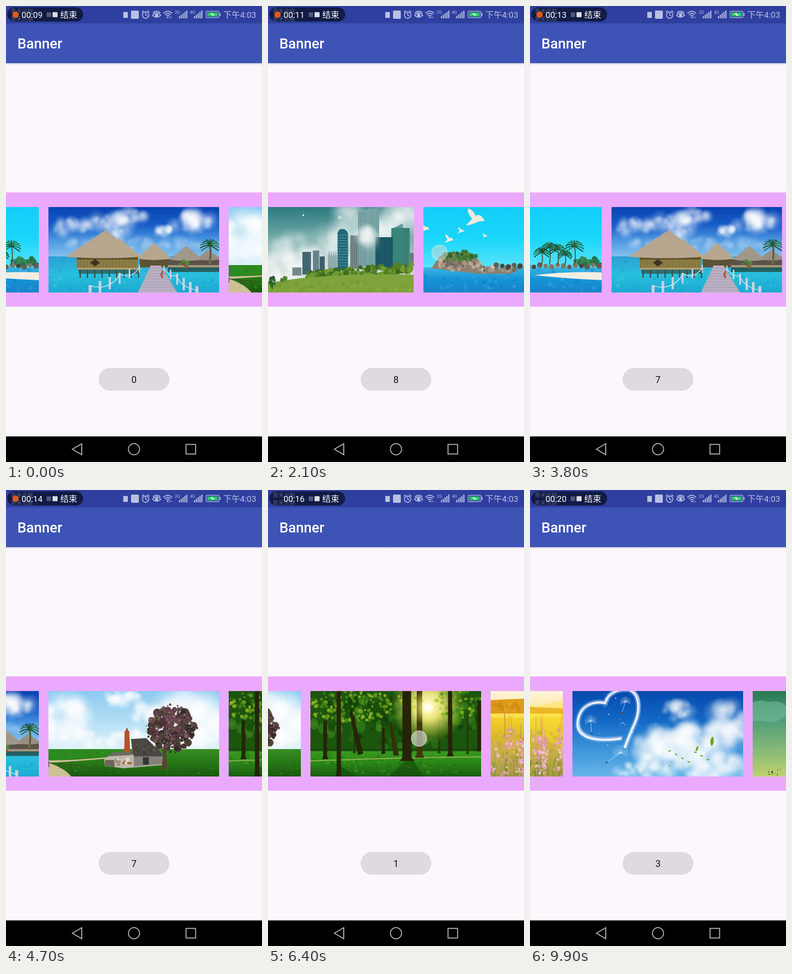
An HTML page that plays this animation: 561x998 px, repeating every 10 s.

```html
<!DOCTYPE html>
<html lang="zh">
<head>
<meta charset="utf-8">
<title>Banner</title>
<style>
html, body { margin: 0; width: 100%; height: 100%; overflow: hidden; background: #fbf7fc; }
svg { display: block; }
#stage { width: 100vw; height: 100vh; }
text { font-family: Roboto, "Noto Sans CJK SC", "Noto Sans CJK", sans-serif; }
</style>
</head>
<body>
<svg id="stage" viewBox="0 0 561 998">
  <defs id="defs">
    <radialGradient id="puff"><stop stop-color="#fff"/><stop offset=".45" stop-color="#fff" stop-opacity=".55"/><stop offset="1" stop-color="#fff" stop-opacity="0"/></radialGradient>
    <radialGradient id="sun"><stop offset=".12" stop-color="#fffff0"/><stop offset=".4" stop-color="#fbef8a" stop-opacity=".85"/><stop offset="1" stop-color="#d8e030" stop-opacity="0"/></radialGradient>
    <linearGradient id="shade" x2="0" y2="1"><stop stop-color="#8f8fa5" stop-opacity=".65"/><stop offset="1" stop-color="#fbf7fc" stop-opacity="0"/></linearGradient>
  </defs>
  <rect width="561" height="998" fill="#fbf7fc"/>
  <rect y="124" width="561" height="7" fill="url(#shade)"/>
  <rect width="561" height="125" fill="#3d53b6"/>
  <rect width="561" height="38" fill="#2f3f9f"/>
  <text x="25" y="93" font-size="31" font-weight="500" fill="#fff">Banner</text>

  <rect x="3" y="3" width="166" height="31" rx="15.5" fill="#111b45"/>
  <g font-size="12.5" fill="#8f96b4" opacity=".5">
    <text x="10" y="16">青禾讯联</text><text x="10" y="33">青禾讯联</text>
    <rect x="89" y="14" width="10" height="10"/>
  </g>
  <circle id="rec" cx="21" cy="19" r="7" fill="#de5a1c"/>
  <text id="clock" x="34" y="26" font-size="18.5" fill="#fff"></text>
  <rect x="102" y="13.5" width="11" height="11" rx="1" fill="#dedfe6"/>
  <text x="119" y="26" font-size="18.5" fill="#fff">结束</text>
  <g id="icons" fill="#b9c0e3" stroke="#b9c0e3" stroke-width="0"></g>

  <rect y="408" width="561" height="250" fill="#eba9fd"/>
  <g id="slides"></g>
  <g id="touch"><circle r="17" fill="#d9d9d6" fill-opacity=".65" stroke="#fff" stroke-opacity=".4" stroke-width="2"/></g>

  <g id="toast">
    <rect x="203" y="792" width="155" height="50" rx="25" fill="#dedadf"/>
    <text id="label" x="280.5" y="825" font-size="20.5" text-anchor="middle" fill="#111"></text>
  </g>

  <rect y="942" width="561" height="56" fill="#000"/>
  <g fill="none" stroke="#bdbdbd" stroke-width="2">
    <path d="M145.5 970 166 958V982Z"/>
    <circle cx="280.5" cy="970" r="12.2"/>
    <rect x="394.5" y="959.5" width="21" height="21"/>
  </g>
</svg>
<script>
const $ = id => document.getElementById(id);
const W = 374, H = 187, PITCH = 395, LOOP = 10000;

let seed = 7;
const rnd = () => (seed = (seed * 16807) % 2147483647) / 2147483647;
const pick = list => list[Math.floor(rnd() * list.length)];
const times = (n, fn) => Array.from({ length: n }, (_, i) => fn(i)).join('');
const clamp = v => Math.max(0, Math.min(1, v));

const rect = (x, y, w, h, fill, more = '') => `<rect x="${x}" y="${y}" width="${w}" height="${h}" fill="${fill}" ${more}/>`;
const disc = (x, y, r, fill, more = '') => `<circle cx="${x.toFixed(1)}" cy="${y.toFixed(1)}" r="${r.toFixed(1)}" fill="${fill}" ${more}/>`;
const shape = (d, fill, more = '') => `<path d="${d}" fill="${fill}" ${more}/>`;
const line = (d, color, width = 1, more = '') => `<path d="${d}" fill="none" stroke="${color}" stroke-width="${width}" ${more}/>`;

let washes = 0;
function wash(y, h, ...colors) {
  const id = 'wash' + washes++;
  const stops = colors.map((c, i) => `<stop offset="${i / (colors.length - 1)}" stop-color="${c}"/>`).join('');
  $('defs').insertAdjacentHTML('beforeend', `<linearGradient id="${id}" x2="0" y2="1">${stops}</linearGradient>`);
  return rect(0, y, W, h, `url(#${id})`);
}

// Scatter discs in an ellipse or in a box.
const blob = (n, x, y, rx, ry, r, colors, alpha = 1) => times(n, () => {
  const a = rnd() * 6.283, d = Math.sqrt(rnd());
  return disc(x + Math.cos(a) * d * rx, y + Math.sin(a) * d * ry, r * (.5 + rnd()), pick(colors), `opacity="${alpha}"`);
});
const field = (n, x, y, w, h, r, colors, alpha = 1) => times(n, () =>
  disc(x + rnd() * w, y + rnd() * h, r * (.5 + rnd()), pick(colors), `opacity="${alpha}"`));
const cloud = (x, y, rx, ry, alpha = .5) => blob(Math.round(10 + rx * .4), x, y, rx, ry, 5 + ry * .5, ['url(#puff)'], alpha);

const palm = (x, y, h, s) => line(`M${x} ${y}q4 ${-h / 2} 0 ${-h}`, '#4a4a35', 2) + times(11, i => {
  const a = Math.PI * (i / 10 * 1.3 - 1.15), c = Math.cos(a) * s, d = Math.sin(a) * s;
  return line(`M${x} ${y - h}q${c * .6} ${d * .8 - 2} ${c} ${d * .7 + 5}`, pick(['#1d5a3a', '#2a7040', '#184a35']), 2.2);
});
const roof = (l, peak, r, y, top, fill = '#b8a68f') =>
  shape(`M${l} ${y}Q${(l + peak) / 2} ${(y + top) / 2} ${peak} ${top}Q${(r + peak) / 2} ${(y + top) / 2} ${r} ${y}Q${peak} ${y + 6} ${l} ${y}Z`, fill) +
  times(Math.round((r - l) / 4), i => line(`M${peak} ${top + 3}L${l + 3 + i * 4} ${y}`, i % 2 ? '#8f7d68' : '#d4c4ad', .6, 'opacity=".35"'));
const tower = (x, y, w, bottom, fill, trim) =>
  rect(x, y, w, bottom - y, fill) + times(Math.floor(w / 4), i => rect(x + 1 + i * 4, y + 2, 1.2, bottom - y - 2, trim, 'opacity=".5"'));
const bird = (x, y, s) => shape(`M${x} ${y}q${-s * .5} ${-s * .6} ${-s * .4} ${-s}q${s * .6} ${s * .2} ${s * .7} ${s * .7}q${s * .5} ${-s * .3} ${s * .9} ${s * .5}q${-s * .5} 0 ${-s * .7} ${s * .1}q${-s * .6} ${s * .3} ${-s * 1.1} ${s * .3}Z`, '#f0eae0');
const trunk = (x, top, bottom, w, fill = '#262408') => shape(`M${x - w / 2} ${top}H${x + w / 2}L${x + w * .55} ${bottom - 8}L${x + w * .9} ${bottom}H${x - w * .8}L${x - w * .5} ${bottom - 8}Z`, fill);
const seedHead = (x, y, s, dx, dy) => line(`M${x} ${y}l${dx} ${dy}`, '#e6f0fa', .8) + disc(x + dx, y + dy, 2, '#5a4335') +
  times(14, i => line(`M${x} ${y}l${Math.cos(i * .3 - 3.6) * s} ${Math.sin(i * .3 - 3.6) * s}`, '#fff', .7, 'opacity=".75"'));
const leaf = (x, y, s, turn) => shape(`M0 ${-s}Q${s * .7} 0 0 ${s}Q${-s * .7} 0 0 ${-s}Z`, '#69a52b', `transform="translate(${x} ${y}) rotate(${turn})"`);

const huts = () => wash(0, 112, '#0744b2', '#155bc6', '#4f9ae2', '#8ac4ee') +
  cloud(50, 46, 46, 18, .28) + cloud(135, 42, 46, 22, .33) + cloud(180, 25, 36, 16, .33) + cloud(315, 36, 44, 22, .45) + cloud(255, 52, 20, 8, .4) +
  cloud(205, 80, 170, 12, .13) + wash(108, 79, '#2d9fd4', '#27bfdc', '#1ca9d2') +
  field(60, 0, 112, W, 72, 3, ['#5fd3e6', '#168fc2'], .3) +
  rect(262, 114, 112, 13, '#5a5248') + rect(262, 127, 112, 5, '#a59479') + rect(262, 132, 112, 10, '#245f60') +
  roof(322, 351, 380, 114, 94, '#968c80') + roof(266, 302, 338, 115, 85, '#a0968a') + shape('M350 125q6 -20 1 -42l4 0q3 20 1 42Z', '#6b6a45') + palm(354, 112, 28, 22) +
  roof(130, 155, 206, 110, 68) + rect(200, 112, 62, 20, '#5d5233') + roof(195, 231, 270, 113, 78) +
  rect(62, 108, 134, 25, '#8d7c44') + times(19, i => rect(64 + i * 7, 110, 1, 22, '#6d5d30', 'opacity=".6"')) + rect(62, 108, 134, 7, '#5f5028') +
  rect(64, 133, 140, 4, '#b09d70') + rect(66, 137, 132, 9, '#2f5d58', 'opacity=".8"') + times(9, i => rect(68 + i * 16, 137, 3, 18, '#38544f')) +
  shape('M91 122l11-8 11 8-11 8Z', '#3d3420') + roof(38, 126, 200, 109, 50) +
  shape('M224 128H246L282 187H196Z', '#b9b0c1') + times(9, i => rect(218 - i * 2, 133 + i * 6, 34 + i * 5, .7, '#978ea6')) +
  blob(14, 298, 125, 10, 8, 3, ['#a5443f', '#4e8a3c']) + blob(9, 252, 148, 5, 12, 2, ['#b04a3c', '#8a6b5a']) +
  times(6, i => rect(198 - i * 22, 126 + i * 9, 2.5 + i * .8, 18 + i * 3, '#c9d0e0') + rect(252 + i * 14, 128 + i * 9, 2.5 + i * .8, 18 + i * 3, '#c9d0e0')) +
  line('M200 132Q180 160 157 146Q135 185 90 172M252 132Q264 154 280 150Q292 178 328 182', '#d3e2ea', 1.6);

const meadow = () => wash(0, 130, '#8bcaf0', '#b2def5', '#e2f3fa') +
  cloud(38, 60, 50, 40) + cloud(160, 14, 40, 14) + cloud(225, 50, 50, 20) + cloud(310, 65, 75, 48) + cloud(185, 105, 185, 16, .4) +
  wash(127, 60, '#398d22', '#277717', '#1b570e') + shape('M0 127H170L120 143 0 153Z', '#2d8a20') +
  field(110, 0, 132, W, 52, 1.8, ['#3b8f27', '#1b6812'], .45) +
  shape('M0 152Q70 151 136 144V147Q60 154 0 157ZM0 157Q35 168 50 187H0Z', '#cdbf98') +
  times(6, i => rect(i * 25, 154 + i * 3, 1.3, 12, '#4a3828')) + line('M0 157 76 165', '#4a3828') +
  shape('M122 150 134 140 190 138 250 144V162L165 169 124 164Z', '#bfb7ab') + shape('M124 151H145V167L124 163Z', '#6b655a') +
  shape('M187 143H249V160L187 165Z', '#85807c') + rect(207, 145, 13, 16, '#33352f') +
  shape('M184 133 181 105 214 103 249 137 247 143 187 143Z', '#4b4742') + shape('M128 143 140 135 182 132 184 140Z', '#6b6a66') +
  blob(40, 212, 125, 26, 14, 1.5, ['#3c3731', '#625b52']) + blob(16, 166, 155, 20, 7, 3, ['#e0dacd', '#a2937f']) + blob(8, 172, 157, 9, 5, 2.4, ['#a86b48']) +
  shape('M167 87H177L179 133H166Z', '#b8502a') + rect(170, 82, 4, 6, '#a34624') +
  shape('M252 120H258L260 171H248Z', '#594332') + line('M255 135L232 105M256 130L292 95', '#594332', 3) +
  blob(170, 270, 82, 51, 46, 6, ['#4b3539', '#60424a', '#39282f', '#4f4238', '#6d4a54']) + blob(190, 270, 82, 58, 53, 1.8, ['#8d686c', '#40392b', '#684850', '#59603a']);

const forest = () => rect(0, 0, W, H, '#1c550e') + blob(130, 187, 60, 190, 66, 8, ['#2b7418', '#16480a', '#3b861c', '#113b08'], .6) +
  wash(130, 57, '#3a9c1e', '#2a8418', '#195c0f') + field(110, 0, 132, W, 50, 3, ['#4cab25', '#1a6810'], .35) + rect(0, 127, W, 5, '#153d0a', 'opacity=".6"') +
  times(6, i => trunk(34 + i * 62, 55, 134 + i % 3 * 2, 4, '#243c0c')) + disc(257, 32, 82, 'url(#sun)') +
  blob(150, 85, 32, 100, 36, 3, ['#7ba81c', '#a2c424', '#4d8e18', '#5f9c1b'], .75) + blob(70, 325, 28, 55, 32, 3, ['#7bad1a', '#3d8614', '#98b820'], .75) + blob(30, 215, 20, 30, 22, 3, ['#b5cc30', '#7da31d'], .7) +
  line('M0 153Q210 145 374 144', '#86b04c', 2.5) + shape('M210 150 172 187H248L225 150ZM60 160 72 187H100Z', '#14480a', 'opacity=".6"') +
  trunk(32, 65, 149, 8) + trunk(62, 0, H, 9) + shape('M85 42 91 42 116 137 104 140Z', '#262408') + shape('M172 70H178L194 141H182Z', '#2f3209') + trunk(160, 80, 137, 5) +
  trunk(211, 0, 153, 19) + trunk(239, 0, 146, 12, '#40380c') + trunk(306, 0, 143, 9) + trunk(370, 20, 132, 8) +
  disc(258, 36, 40, 'url(#sun)', 'opacity=".8"');

const flowers = () => wash(0, 54, '#fff5df', '#fdebb5', '#fadf78') +
  shape('M0 20Q60 16 130 17Q220 18 275 34Q330 36 374 38V52H0Z', '#dd9a1a') + blob(90, 135, 35, 140, 13, 4, ['#c98012', '#e6a826', '#d38e18'], .5) +
  wash(49, 138, '#fbd629', '#dcbd28', '#c4ab46', '#a39a48') + rect(0, 50, W, 8, '#ffee7a', 'opacity=".5"') +
  shape('M374 20V125Q300 95 250 50Z', '#ffe23e', 'opacity=".4"') +
  field(140, 0, 85, W, 100, 5, ['#bfa339', '#a89b40', '#d3ae62'], .45) +
  times(80, () => line(`M${rnd() * W} 187q${rnd() * 10 - 5} -15 ${rnd() * 12 - 6} ${-20 - rnd() * 45}`, pick(['#76902c', '#96983f', '#5f8028']), 1.4, 'opacity=".8"')) +
  times(38, () => {
    const x = rnd() * W, y = 60 + rnd() * 70, lean = rnd() * 8 - 4;
    return line(`M${x} ${y + 30}q0 -25 ${lean} -50`, '#cf8a52', 1.2, 'opacity=".7"') + blob(20, x, y + 36, 9, 28, 2.2, ['#e8a4bf', '#dd92ae', '#f3c3cf'], .75);
  }) + times(5, i => line(`M${30 + i * 49} 100q3 -25 ${i % 2 * 4} ${-54 - i % 3 * 13}`, '#d18a4a', 1.8)) +
  field(240, 0, 108, W, 78, 2.6, ['#eda9c2', '#df90b0', '#f6c9d2', '#dc9a9c'], .75) + field(60, 60, 150, 270, 36, 2.6, ['#6f8a2d', '#8f9a3e'], .7);

const heart = () => {
  const d = 'M108 103C50 112 8 102 12 67C16 30 47 21 72 26C78 4 98 -5 124 -3C150 6 148 45 137 70Q126 94 115 124';
  return wash(0, H, '#0549ad', '#1268c4', '#3b94da', '#65b5e8') +
    cloud(310, 100, 75, 32, .42) + cloud(200, 118, 60, 32, .42) + cloud(250, 120, 85, 30, .38) + cloud(260, 160, 120, 28, .45) + cloud(340, 65, 40, 34, .42) + cloud(230, 42, 30, 18, .35) + cloud(150, 173, 55, 14, .35) +
    line(d, '#bfe2ff', 12, 'opacity=".3"') + line(d, '#eaf5ff', 6, 'opacity=".7"') + line(d, '#fff', 2.5, 'transform="translate(-1 1)"') + line(d, '#cbbdeb', 1.3, 'transform="translate(3 -2)"') +
    blob(16, 78, 62, 65, 58, .9, ['#e8f6ff']) + blob(9, 155, 70, 60, 20, .7, ['#e8f6ff']) +
    seedHead(40, 66, 13, 2, 26) + seedHead(116, 24, 12, -8, 24) + seedHead(105, 136, 18, -30, 20) +
    times(7, i => leaf(213 + i * 14, 131 + i * 37 % 29, 4, 70 + i * 53 % 60)) + leaf(306, 110, 11, 5) + leaf(273, 126, 7, 20) + leaf(213, 164, 3, 100);
};

const dusk = () => wash(0, H, '#287952', '#4f9d77', '#83b77a', '#bdd26b') +
  shape('M0 25Q18 17 34 24Q60 18 76 35Q130 20 190 40H374V68Q180 75 74 55L45 70Q20 62 0 67Z', '#75b99c', 'opacity=".6"') +
  blob(14, 55, 176, 38, 8, 1.4, ['#263f18', '#41571e']);

const river = () => wash(0, 75, '#c3dff0', '#eaf2f4') + shape('M250 70Q330 25 374 40V95H250Z', '#9fb2b7') +
  blob(120, 285, 75, 70, 21, 6, ['#1d3d21', '#2c542a', '#132c1a']) +
  shape('M342 84 356 69 374 75V103H342Z', '#cdb28d') + shape('M339 84 356 69 374 76V82Z', '#775344') +
  rect(0, 98, W, 65, '#50595a') + shape('M0 110 374 118V171L250 142 0 138Z', '#3d4846') + field(65, 200, 112, 174, 9, 4, ['#355b25', '#264a1f']) +
  times(50, i => rect(i * 7.5, 101, 4, 9, '#dfe3df')) + rect(0, 99, W, 2, '#edf0ec') +
  shape('M0 140H250L374 174V187H0Z', '#264e4c') + times(34, () => rect(rnd() * 350, 145 + rnd() * 40, 22, 1.3, '#789b95', 'opacity=".6"'));

const city = () => wash(0, H, '#2d7a7e', '#6ba5a4', '#c5d4d3', '#e3e9e3') +
  cloud(300, 35, 110, 50, .28) + cloud(50, 135, 95, 30, .35) + cloud(165, 85, 100, 30, .18) + cloud(165, 115, 80, 25, .25) +
  disc(132, 18, 2, '#dff4f4') + disc(212, 23, 4, '#eef7f5', 'opacity=".5"') +
  tower(108, 132, 20, 150, '#7d9295', '#415960') + tower(130, 98, 19, 148, '#496d78', '#243f4e') + tower(153, 95, 14, 145, '#708c93', '#344f5c') + tower(168, 108, 11, 142, '#426471', '#213d4a') +
  times(4, i => shape(`M${186 + i * 5} 140V110l2.5 -16 2.5 16V140Z`, '#8ba9ac')) +
  shape('M207 138V57Q209 48 217 48Q228 48 230 60V138Z', '#216779') + times(12, i => rect(208, 61 + i * 6, 21, 1.2, '#71adb3', 'opacity=".7"')) +
  tower(235, 62, 26, 135, '#7b8c8d', '#384e57') + tower(252, 8, 22, 130, '#82aaa9', '#34666f') + tower(273, 2, 25, 132, '#679998', '#c5dedb') +
  tower(325, 46, 40, 130, '#31796d', '#68aa93') + shape('M325 48 350 36V125H325Z', '#39877d', 'opacity=".75"') + tower(290, 66, 38, 135, '#1c5362', '#28707c') + tower(362, 100, 12, 130, '#6a8a88', '#36555a') +
  cloud(272, 62, 12, 26, .3) +
  times(23, i => blob(7, 148 + i * 10, 149 - i * .7, 9, 10, 4.5, ['#547f24', '#709b30', '#3d6920'])) +
  shape('M0 179Q130 142 374 148V187H0Z', '#7da33a') + field(55, 50, 163, 320, 22, 4, ['#96b950', '#668f2d'], .3) +
  blob(16, 64, 164, 5, 11, 3, ['#285a2d', '#397133']) + rect(63, 172, 2, 8, '#3f4923') + blob(14, 87, 157, 9, 5, 3, ['#44762b', '#5c8d33']);

const island = () => wash(0, 136, '#12cdf8', '#1ad6fb', '#5ce4fb') + wash(132, 55, '#39b4e2', '#1592d6', '#1b83c9') +
  field(70, 0, 138, W, 46, 3, ['#5ac0e9', '#0e78bd', '#3ba8df'], .35) +
  shape('M225 149Q300 140 374 143V160Q300 157 225 149Z', '#f2eee4') +
  shape('M18 134 35 108Q75 90 115 108L130 129 208 139 190 146H120L60 139Z', '#8e7f70') +
  blob(60, 77, 125, 47, 13, 3.4, ['#a59281', '#74695d', '#bcaa96']) + blob(75, 77, 107, 38, 10, 3.4, ['#3f7636', '#598a3c', '#2d6030']) +
  field(28, 120, 130, 90, 9, 4, ['#a8998a', '#776c62', '#d5c7b5']) + blob(36, 345, 120, 34, 8, 4.5, ['#28744a', '#398956']) +
  times(17, i => disc(160 + i * 13, 127 + i % 3 * 2, 6 - i % 2, pick(['#625d55', '#80766a', '#48473f']))) +
  palm(242, 126, 27, 18) + palm(259, 126, 38, 18) + palm(277, 126, 34, 18) + palm(293, 126, 22, 16) + palm(314, 126, 40, 21) +
  bird(107, 26, 23) + bird(53, 71, 11) + bird(80, 52, 8) + bird(133, 63, 6) + bird(0, 47, 11);

const scenes = [huts, meadow, forest, flowers, heart, dusk, river, city, island];
$('slides').innerHTML = scenes.map(draw => `<svg y="440" width="${W}" height="${H}" overflow="hidden">${draw()}</svg>`).join('');
const slides = [...$('slides').children];

const ink = '#b9c0e3';
const bars = x => times(5, i => rect(x + i * 4, 22 - i * 3, 2.4, 5 + i * 3, ink));
$('icons').innerHTML =
  rect(257, 13, 10, 13, ink) + rect(274, 10, 17, 18, ink, 'rx="2"') +
  line('M313 20a7 7 0 1 1-14 0a7 7 0 1 1 14 0M306 15v5l4 2M298 14l4-4M314 14l-4-4', ink, 1.8) +
  line('M321 20Q330 10 339 20Q330 29 321 20M322 15Q330 8 338 15', ink, 1.8) + disc(330, 20, 3.5, ink) +
  line('M345 16Q354.5 7 364 16M348 19Q354.5 13 361 19M351 22Q354.5 19 358 22', ink, 2) + disc(354.5, 25, 1.8, ink) +
  line('M359 27v-4M362 23v4', ink) +
  '<text x="370" y="17" font-size="9">2G</text><text x="403" y="17" font-size="9">4G</text>' + bars(379) + bars(412) +
  rect(438.5, 11.5, 28, 14, 'none', 'rx="2" stroke-width="1.3"') + rect(441, 14, 23, 9, '#25c267') + rect(468, 15, 2, 7, ink) +
  shape('M446 18l7-3v3h6l-7 4v-3Z', '#e7f5ee') +
  '<text x="476" y="26" font-size="18.4">下午4:03</text>';

// Start, end, page at the end; the first page is 0.
const swipes = [[100, 900, -1], [1800, 2550, -2], [3100, 3500, -1], [3600, 4000, 0], [4100, 4600, 1], [5400, 6150, 2], [6800, 7450, 3], [7980, 8400, 4]];
// Time, x, y, length.
const taps = [[1250, 310, 535, 200], [2760, 308, 530, 220], [4850, 330, 540, 200], [6320, 331, 544, 220], [7810, 350, 545, 160]];
const toasts = [[-500, 0], [1450, 8], [3150, 7], [5200, 1], [6750, 2], [8050, 3]];

function pageAt(t) {
  let page = 0;
  for (const [start, end, to] of swipes) {
    const k = clamp((t - start) / (end - start));
    page += (to - page) * (k < .35 ? 1.5 * k * k / .35 : 1 - .475 * ((1 - k) / .65) ** 3);
    if (k < 1) break;
  }
  return page;
}

function touchAt(t) {
  const tap = taps.find(([start, , , span]) => t > start && t < start + span);
  if (tap) return [tap[1], tap[2], clamp((t - tap[0]) / 80)];
  let from = 0;
  for (const [start, end, to] of swipes) {
    const k = (t - start) / (end - start) / .5;
    if (k > 0 && k < 1) {
      const dir = Math.sign(from - to);
      return [310 + dir * (k * 170 - 70), 540, clamp((1 - k) * 4)];
    }
    from = to;
  }
  return [0, 0, 0];
}

function render(t) {
  const page = pageAt(t), n = slides.length;
  slides.forEach((slide, i) => {
    const offset = ((i - page + n * 1.5) % n + n) % n - n / 2;
    slide.setAttribute('x', (93 + PITCH * offset).toFixed(1));
    slide.style.display = Math.abs(offset) < 1.3 ? '' : 'none';
  });

  const [x, y, alpha] = touchAt(t);
  $('touch').setAttribute('transform', `translate(${x} ${y})`);
  $('touch').setAttribute('opacity', alpha);

  const current = toasts.findLastIndex(([start]) => t >= start);
  const next = toasts[current + 1];
  const shown = Math.min(clamp((t - toasts[current][0]) / 150), next ? clamp((next[0] - 100 - t) / 200) : 1);
  $('label').textContent = toasts[current][1];
  $('toast').setAttribute('opacity', shown);
  $('toast').setAttribute('transform', `translate(0 ${8 * (1 - shown)})`);

  const seconds = 9.77 + t * .00104;
  $('clock').textContent = '00:' + String(Math.floor(seconds)).padStart(2, '0');
  $('rec').setAttribute('opacity', seconds % 1 < .5 ? 0 : 1);
}

const origin = performance.now();
function tick() {
  const t = (performance.now() - origin) % LOOP;
  render(Math.floor(t / 100) * 100);
  requestAnimationFrame(tick);
}
tick();
</script>
</body>
</html>
```
